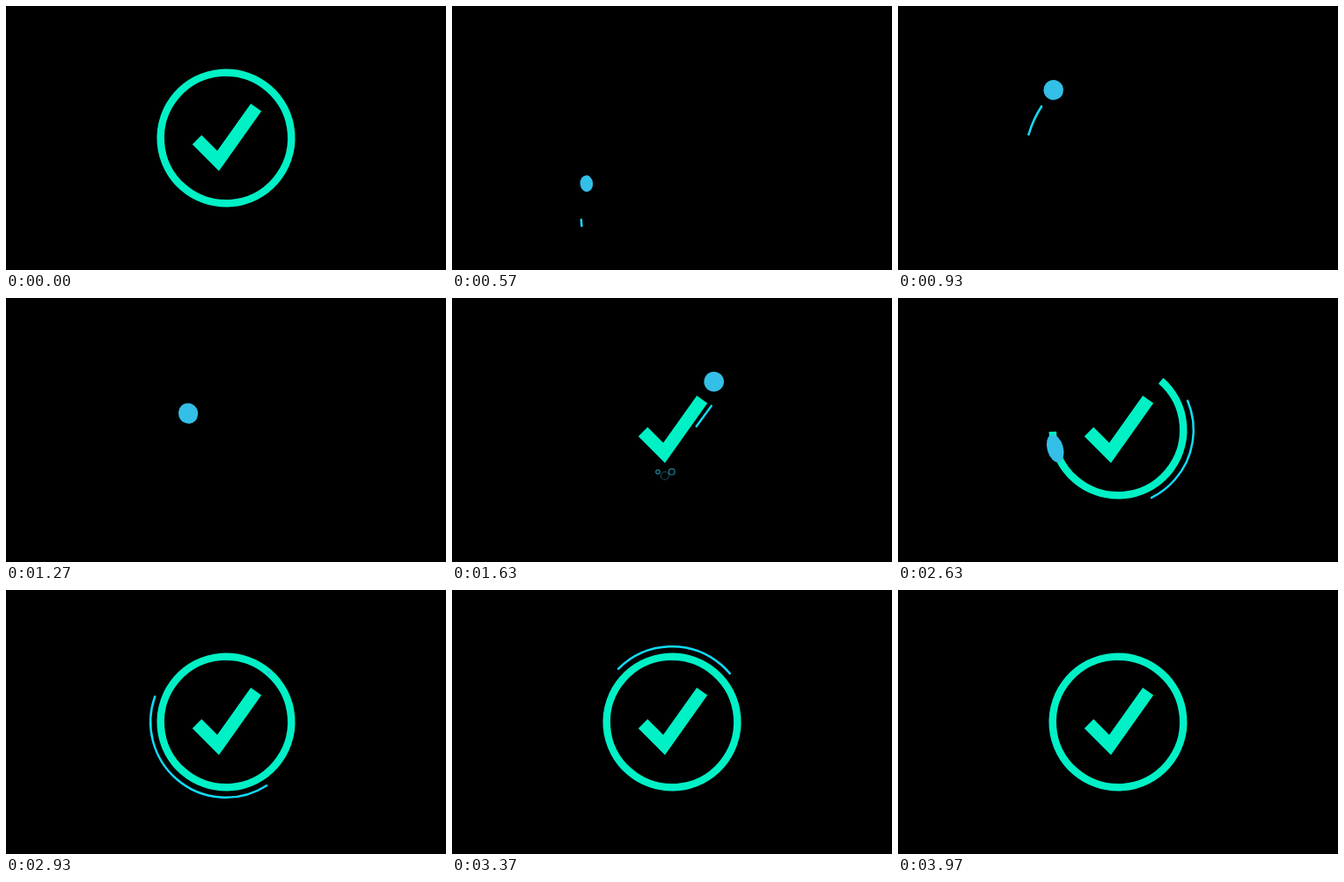
An HTML page for the animation above (4010 ms loop, 500x300 px).

```html
<!DOCTYPE html>
<html lang="en">
<head>
<meta charset="utf-8">
<title>Check mark</title>
<style>
  html, body { margin: 0; width: 100%; height: 100%; overflow: hidden; background: #000; }
  svg { display: block; width: 500px; height: 300px; }
  path, circle { fill: none; }
  .mark { stroke: #00f1c6; }
  .trail { stroke: #10dcf6; stroke-width: 2.5; stroke-linecap: round; }
  .drop { stroke: #2bb9d6; stroke-width: 1.2; }
  #dot { fill: #33bfe7; }
</style>
</head>
<body>
<svg viewBox="0 0 500 300">
  <path id="check" class="mark" stroke-width="14.8" pathLength="109" d="M217 152L241 176L284.2 115.2"/>
  <circle id="ring" class="mark" stroke-width="8.5" pathLength="360" cx="250" cy="150" r="74.3" transform="rotate(-49 250 150)"/>
  <path id="riseTrail" class="trail" pathLength="1" d="M147.4 250C143.4 199 131.4 149 175.4 97.5"/>
  <path id="lineTrail" class="trail" pathLength="1" d="M252 181L300 115.5"/>
  <circle id="ringTrail" class="trail" pathLength="360" cx="250" cy="150" r="85.8" transform="rotate(-49 250 150)"/>
  <circle class="drop" r="2.3"/><circle class="drop" r="4.5"/><circle class="drop" r="3.4"/>
  <ellipse id="dot"/>
</svg>
<script>
const LOOP = 4010, START = 500, DEG = 180 / Math.PI;
const $ = id => document.getElementById(id);
const drops = document.querySelectorAll('.drop');

const ramp = (t, from, to) => Math.min(1, Math.max(0, (t - from) / (to - from)));
const easeIn = p => u => u ** p;
const easeOut = p => u => 1 - (1 - u) ** p;
const smooth = u => u * u * (3 - 2 * u);
const surge = u => 1 - (1 - u ** 2.3) ** 3;

// The dot's journey: rise, fall into the check, climb out of it, run round the ring.
function leg(from, to, ease, d) {
  const path = document.createElementNS('http://www.w3.org/2000/svg', 'path');
  path.setAttribute('d', d);
  const length = path.getTotalLength();
  return { from, path, length, travel: t => length * ease(ramp(t, from, to)) };
}
const rise = leg(500, 1050, easeOut(2), 'M158 240C146 180 150 94 184 94');
const fall = leg(1050, 1380, easeIn(2), 'M184 94C204 94 204 139 217 152L241 176');
const climb = leg(1380, 2030, easeOut(4.2), 'M241 176L284 115C292 104 302 90 304 82');
const orbit = leg(2030, 2900, easeIn(1.38), 'M304 82C306 92 310 104 317 117.3A74.5 74.5 0 1 1 298.8 94');
const legs = [rise, fall, climb, orbit];

function dotAt(t) {
  const now = legs.findLast(l => t >= l.from) || rise;
  return now.path.getPointAtLength(now.travel(t));
}

function set(el, attrs) {
  for (const k in attrs) el.setAttribute(k, attrs[k]);
}

function trim(id, from, to) {
  const el = $(id), total = +el.getAttribute('pathLength'), part = (to - from) / total;
  el.style.display = part > .001 ? '' : 'none';
  set(el, {
    'stroke-dasharray': part >= 1 ? 'none' : `${to - from} ${total - to + from}`,
    'stroke-dashoffset': -from
  });
}

function drawMark(t) {
  const down = Math.max(0, fall.travel(t) - fall.length + 34);
  trim('check', 0, down + Math.min(75, climb.travel(t)));
  // The ring's tip runs slightly ahead of the dot.
  const angle = 360 - (orbit.length - orbit.travel(t)) / 74.5 * DEG;
  trim('ring', 0, Math.min(360, Math.max(0, angle * 1.065)));
}

function drawTrails(t) {
  trim('riseTrail', ramp(t, 600, 1010) ** 2, smooth(ramp(t, 500, 1055)));
  trim('lineTrail', ramp(t, 1470, 1770), easeOut(2)(ramp(t, 1430, 1730)));
  trim('ringTrail', 371 * surge(ramp(t, 2300, 3970)),
    16 * ramp(t, 2080, 2170) + 355 * surge(ramp(t, 2136, 3480)));
}

function drawSplash(t) {
  const k = easeOut(2)(ramp(t, 1390, 1760));
  const fade = ramp(t, 1390, 1420) * (1 - ramp(t, 1570, 1770));
  drops.forEach((el, i) => set(el, {
    cx: 241 + (9 * i - 8) * k,
    cy: 184 + (i === 1 ? 20.5 : 15.5) * k,
    transform: '',
    opacity: fade * (i === 1 ? .6 : 1)
  }));
}

function drawDot(t) {
  const at = dotAt(t), a = dotAt(t - 4), b = dotAt(t + 4);
  const dx = b.x - a.x, dy = b.y - a.y;
  const speed = Math.hypot(dx, dy) / .008;
  const stretch = 1 + Math.min(.43, Math.max(0, speed - 400) / 600);
  const r = 11.3 * ramp(t, 500, 600) * (1 - ramp(t, 2660, 2990));
  set($('dot'), {
    rx: r * stretch, ry: r * stretch ** -.6,
    transform: `translate(${at.x} ${at.y}) rotate(${Math.atan2(dy, dx) * DEG})`
  });
}

function draw(now) {
  let t = now % LOOP;
  if (t < START) t += LOOP; // the finished mark holds into the next loop
  drawMark(t);
  drawTrails(t);
  drawSplash(t);
  drawDot(t);
}

const begin = performance.now();
function tick() {
  draw(performance.now() - begin);
  requestAnimationFrame(tick);
}
tick();
</script>
</body>
</html>
```
